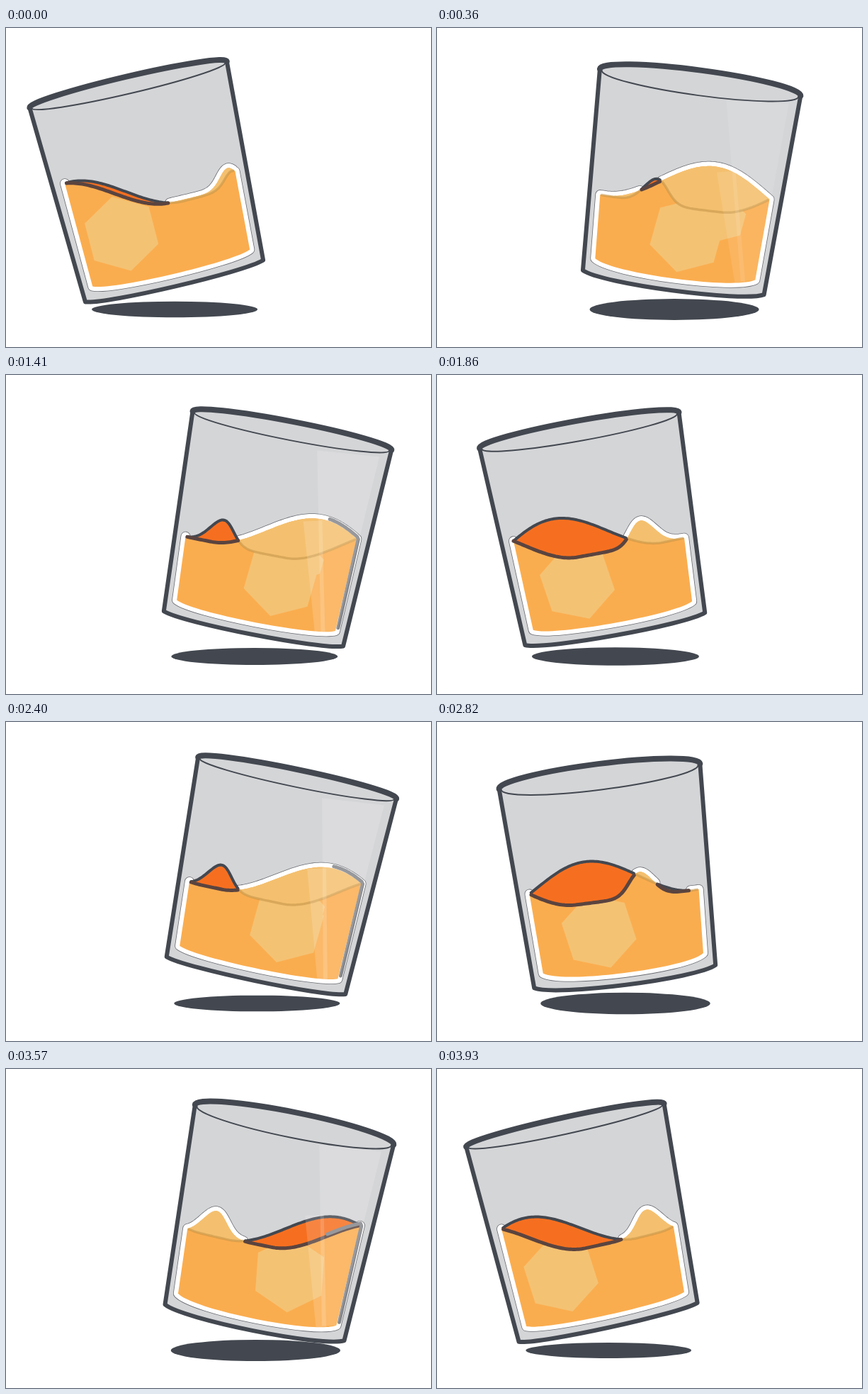
Write an HTML page with a canvas that moves like this. It is 600 px wide and 450 px high and loops after 3.99 s.

```html
<!DOCTYPE html>
<html lang="en">
<head>
<meta charset="utf-8">
<title>Swirling glass</title>
<style>
html, body { margin: 0; width: 100%; height: 100%; overflow: hidden; background: #fff; }
canvas { display: block; }
</style>
</head>
<body>
<canvas id="stage" width="600" height="450"></canvas>
<script>
const ctx = document.getElementById('stage').getContext('2d');
const LOOP = 3990, TAU = 2 * Math.PI, DARK = '#434850';
const HALF = 119, STEPS = 100; // half width of the liquid surface, samples across it

// Time in ms -> swings completed; the first swing is a little slow.
const swings = [[0, 0], [990, .955], [1860, 1.89], [LOOP, 4]];

const clamp = x => Math.max(0, Math.min(1, x));
const xAt = i => (2 * i / STEPS - 1) * HALF;

function swingsAt(time) {
  const i = swings.findIndex(([end]) => end > time);
  const [t0, a] = swings[i - 1], [t1, b] = swings[i];
  return a + (b - a) * (time - t0) / (t1 - t0);
}

// Surface height round the rim: a broad crest with a narrow one opposite.
function wave(r, phase, s) {
  const from = crest => { const d = r - phase - crest; return d - Math.round(d); };
  const broad = Math.min(1, Math.abs(from(-.02)) / .31);
  const narrow = Math.exp(-((from(.49) / .05) ** 2)) * (1 - .35 * Math.abs(2 * s - 1) ** 12);
  return -107 - 30.5 * (1 + Math.cos(Math.PI * broad)) - 35 * narrow;
}

function stroke(path, color, width) {
  ctx.strokeStyle = color;
  ctx.lineWidth = width;
  ctx.stroke(path);
}

function fill(path, color) {
  ctx.fillStyle = color;
  ctx.fill(path);
}

function polygon(points) {
  const path = new Path2D();
  for (const [x, y] of points) path.lineTo(x, y);
  path.closePath();
  return path;
}

function hexagon(x, y, radius, turn) {
  return polygon(Array.from({ length: 6 }, (_, i) => {
    const a = turn + i * TAU / 6;
    return [x + radius * Math.cos(a), y + radius * Math.sin(a)];
  }));
}

function walls(path, half, y, sag) {
  path.lineTo(half, y);
  path.bezierCurveTo(half * .78, y + sag * 1.33, -half * .78, y + sag * 1.33, -half, y);
}

function band(top, bottom) {
  const points = curve => curve.map((y, i) => [xAt(i), y]);
  return polygon([...points(top), ...points(bottom).reverse()]);
}

// The parts of a curve that lie above another one.
function partsAbove(curve, other, shown = curve) {
  const path = new Path2D();
  let drawing = false;
  curve.forEach((y, i) => {
    const above = y < other[i];
    if (above) path[drawing ? 'lineTo' : 'moveTo'](xAt(i), shown[i]);
    drawing = above;
  });
  return path;
}

function drawGlass(rim) {
  const body = new Path2D(), back = new Path2D(), lip = new Path2D();
  body.ellipse(0, -283, 143, rim, 0, Math.PI, TAU);
  walls(body, 129, 2, rim * .68);
  body.closePath();
  back.ellipse(0, -283, 143, rim, 0, Math.PI, TAU);
  lip.ellipse(0, -281, 140, rim, 0, 0, Math.PI);
  fill(body, '#d4d5d7');
  stroke(body, DARK, 6);
  stroke(back, DARK, 8);
  stroke(lip, DARK, 2);
}

function drawIce(phase) {
  const cos = Math.cos(TAU * phase), sin = Math.sin(TAU * phase);
  const x = -10 - 48 * Math.cos(TAU * (phase - .03));
  const y = -70 - 10 * Math.cos(2 * TAU * phase);
  const turn = .5 + .2 * sin;
  fill(hexagon(x, y, 54, turn), '#f4c273');
  fill(hexagon(60, -77 + 32 * cos, 38 * clamp(sin), turn), '#f4c273');
}

// Light catching the right side while the glass leans that way.
function drawShine(front, tilt) {
  const side = new Path2D();
  for (let i = STEPS * .82; i <= STEPS; i++) side.lineTo(xAt(i), front[i] - 3);
  side.lineTo(HALF + 2, front[STEPS]);
  side.lineTo(117, -22);
  ctx.globalAlpha = clamp((tilt - 8) / 3);
  stroke(side, '#85868a', 5);
  ctx.globalAlpha = .15 * clamp((tilt - 5) / 4);
  fill(polygon([[40, -262], [128, -270], [116, -17], [94, -12]]), '#fff');
  fill(polygon([[40, -160], [66, -166], [101, -9], [86, -9]]), '#fff');
  ctx.globalAlpha = 1;
}

function drawLiquid(phase, rim, tilt) {
  const front = [], back = [];
  for (let i = 0; i <= STEPS; i++) {
    const s = i / STEPS;
    front.push(wave(s / 2, phase, s));
    back.push(wave(1 - s / 2, phase, s) + 2.5 * Math.sin(Math.PI * s));
  }
  const high = front.map((y, i) => Math.min(y, back[i]));
  const low = front.map((y, i) => Math.max(y, back[i]));

  const edge = new Path2D();
  edge.moveTo(HALF, front[STEPS]);
  walls(edge, 114, -17, rim * .8);
  edge.lineTo(-HALF, front[0]);
  edge.addPath(partsAbove(front, back));
  stroke(edge, '#6b6d72', 14);
  stroke(edge, '#fff', 12.4);

  const face = new Path2D();
  front.forEach((y, i) => face.lineTo(xAt(i), y));
  walls(face, 114, -17, rim * .8);
  face.closePath();
  fill(band(high, front), '#f66f20');
  fill(face, '#faad4f');

  ctx.save();
  ctx.clip(face);
  drawIce(phase);
  ctx.restore();

  fill(band(front, low), '#f4c06f');
  stroke(partsAbove(front, back, back), 'rgba(196,148,72,.55)', 3.5);
  stroke(partsAbove(back, front), DARK, 4);
  stroke(partsAbove(back, front, front), '#5b443f', 5);
  drawShine(front, tilt);
}

function draw(time) {
  const phase = swingsAt(time % LOOP) % 1;
  const rim = 17.5 + 7 * Math.cos(2 * TAU * (phase - .215));
  const lean = -Math.cos(TAU * phase), tilt = 13.2 * lean;
  const x = 298.5 + 61.4 * lean;

  ctx.clearRect(0, 0, 600, 450);
  const shadow = new Path2D();
  shadow.ellipse(x + 1, 397, 112 + rim * .45, 4 + rim * .65, 0, 0, TAU);
  fill(shadow, DARK);

  ctx.save();
  ctx.lineJoin = ctx.lineCap = 'round';
  ctx.translate(x, 358 - 3 * lean * lean);
  ctx.rotate(tilt * Math.PI / 180);
  drawGlass(rim);
  drawLiquid(phase, rim, tilt);
  ctx.restore();
}

const start = performance.now();
function tick() {
  draw(performance.now() - start);
  requestAnimationFrame(tick);
}
tick();
</script>
</body>
</html>
```
